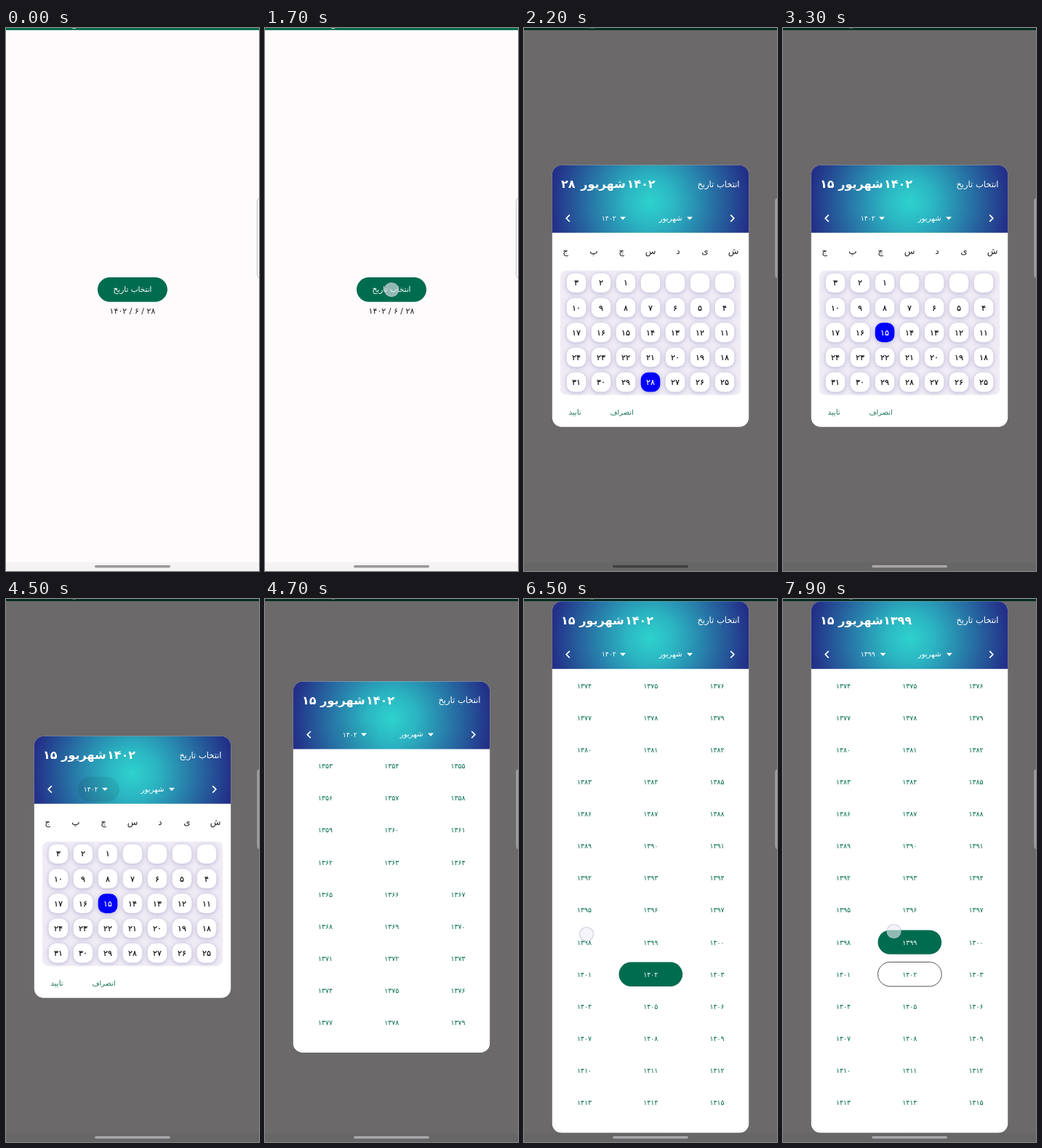
Write an HTML page that moves like this. It is 348x747 px and loops after 8 s.

```html
<!DOCTYPE html>
<html lang="fa">
<head>
<meta charset="utf-8">
<title>Date picker</title>
<style>
html, body { margin: 0; width: 100%; height: 100%; overflow: hidden; background: #fffbfd; }
svg { display: block; width: 100%; height: 100%; }
text { font-family: "DejaVu Sans", "Noto Sans", sans-serif; text-anchor: middle; }
.cell { filter: drop-shadow(0 1px 3px rgba(80, 60, 150, .36)); }
</style>
</head>
<body>
<svg id="stage" viewBox="0 0 348 747"></svg>
<script>
const GREEN = '#006c4f', LOOP = 8000;
const fa = s => String(s).replace(/\d/g, d => String.fromCharCode(1776 + +d));
const clamp = v => Math.max(0, Math.min(1, v));
const ramp = (t, a, b) => clamp((t - a) / (b - a));
const easeOut = (p, n) => 1 - (1 - p) ** n;
const $ = id => document.getElementById(id);
const set = (id, attrs) => { for (const k in attrs) $(id).setAttribute(k, attrs[k]); };

const text = (s, x, y, size, fill, extra = '') =>
  `<text x="${x}" y="${y}" font-size="${size}" fill="${fill}" ${extra}>${fa(s)}</text>`;
const box = (x, y, w, h, r, fill, extra = '') =>
  `<rect x="${x}" y="${y}" width="${w}" height="${h}" rx="${r}" fill="${fill}" ${extra}/>`;
const arrow = (x, id) => `<path id="${id}" d="M${x - 4} 260h8l-4 4.4z" fill="#fff"/>`;

function days() {
  let out = '';
  for (let i = 0; i < 35; i++) {
    const x = 276 - i % 7 * 34, y = 351 + Math.floor(i / 7) * 34.1, day = i - 3;
    out += box(x - 13.3, y - 13.3, 26.6, 26.6, 10, '#fff', `class="cell" id="cell${i}"`);
    if (day > 0) out += text(day, x, y + 3.8, 11, '#111', `id="day${day}" stroke-width=".2" stroke="currentColor"`);
  }
  return out;
}

function years() {
  let out = '';
  for (let i = 0; i < 72; i++) {
    const year = 1353 + i, x = 83 + i % 3 * 91.3, y = 119.7 + Math.floor(i / 3) * 44.05;
    if (year == 1399 || year == 1402)
      out += box(x - 43.8, y - 16.7, 87.6, 33.4, 16.7, 'none', `id="pill${year}" stroke-width="1"`);
    out += text(year, x, y + 3.4, 9.4, GREEN, `id="year${year}"`);
  }
  return out;
}

const bold = 'font-weight="bold"';
$('stage').innerHTML = `
<defs>
  <radialGradient id="glow" gradientUnits="userSpaceOnUse" cx="174" cy="240" r="136">
    <stop offset="0" stop-color="#2ed2cd"/><stop offset=".25" stop-color="#2bb5c2"/>
    <stop offset="1" stop-color="#233088"/>
  </radialGradient>
  <clipPath id="frameClip"><rect id="frame" x="38.8" width="270.4" rx="13"/></clipPath>
  <clipPath id="listClip"><rect id="list" x="38.8" width="270.4"/></clipPath>
</defs>
${box(0, 0, 348, 747, 0, '#fffbfd')}
${box(0, 0, 348, 3, 0, GREEN)}
<path d="M91 0q3 1.6 6-.4" stroke="#b5d6cb" fill="none"/>
${box(126, 343, 96, 33.8, 16.9, GREEN)}
${text('انتخاب تاریخ', 174, 363, 10.5, '#fff')}
${text('1402 / 6 / 28', 174, 393, 11, '#1c1b1d')}
${box(0, 735, 348, 12, 0, '#f6f3f5')}
${box(122, 739, 104, 3.4, 1.7, '#9b999b')}
${box(0, 0, 348, 747, 0, '#000', 'id="scrim"')}
<g id="dialog"><g clip-path="url(#frameClip)">
  ${box(38, 0, 272, 747, 0, '#fff')}
  <g id="calendar">
    ${[...'شیدسچپج'].map((c, i) => text(c, [288, 249, 212, 174, 134, 96, 57][i], 311, 12, '#222')).join('')}
    ${box(50, 334, 248, 171, 8, '#efecf5')}
    ${days()}
    ${text('تایید', 70, 532, 10.2, '#1d765d')}
    ${text('انصراف', 134.5, 532, 9.8, '#1d765d')}
  </g>
  <g clip-path="url(#listClip)">
    ${box(38, 0, 272, 747, 0, '#fff')}
    <g id="years">${years()}</g>
  </g>
  <g id="header">
    ${box(38, 188, 272, 94, 0, 'url(#glow)')}
    ${text('انتخاب تاریخ', 267.5, 219, 11.5, '#fff')}
    ${text('', 51, 220.5, 16, '#fff', bold + ' id="titleDay" style="text-anchor:start"')}
    ${text('شهریور', 109, 220.5, 16, '#fff', bold + ' id="titleMonth"')}
    ${text('', 161, 220.5, 16, '#fff', bold + ' id="titleYear"')}
    ${box(99, 245, 57, 34, 17, '#000', 'id="ripple"')}
    <path d="M284.2 257.5l4.6 4.6-4.6 4.6M62.8 257.5l-4.6 4.6 4.6 4.6" stroke="#fff" stroke-width="1.7" fill="none"/>
    ${text('شهریور', 201.5, 265, 10.2, '#fff')}
    ${arrow(228, 'monthArrow')}
    ${text('', 116.8, 265.3, 9.4, '#fff', 'id="navYear"')}
    ${arrow(136, 'yearArrow')}
  </g>
</g></g>
${box(122, 739, 104, 3.4, 1.7, '#aaa8aa', 'id="homePill"')}
${box(345.5, 234, 10, 110, 4, '#fff', 'fill-opacity=".36" stroke="#999" stroke-opacity=".6"')}
<circle id="touch" r="9.5" fill="#eeecf3" fill-opacity=".6" stroke="#c6c3d6" stroke-opacity=".75" stroke-width="1.2"/>`;

// start, end, x, y
const taps = [
  [1700, 1900, 174, 360], [2900, 3300, 140, 419], [4270, 4470, 128, 262],
  [5950, 6700, 93.5, 535], [7000, 7300, 165, 468], [7600, 8200, 152.5, 457]
];

function draw(t) {
  const shown = ramp(t, 1890, 2083), open = easeOut(ramp(t, 4540, 5080), 3);
  set('scrim', { opacity: .58 * ramp(t, 1930, 2200) });
  set('dialog', { opacity: shown, transform: `translate(0 ${17.5 * (1 - shown)})` });
  set('homePill', { opacity: ramp(t, 2350, 2600) });

  const listH = 638 * open, h = Math.max(360, 93 + listH), top = 368.7 - h / 2;
  set('frame', { y: top, height: h });
  set('list', { y: top + 93, height: listH });
  for (const id of ['calendar', 'header']) set(id, { transform: `translate(0 ${top - 189})` });

  const drag = ramp(t, 5950, 6080) ** 1.5;
  const scroll = 74 * drag + 234.3 * easeOut(ramp(t, 6080, 6500), 2);
  set('years', { transform: `translate(0 ${top - 3.2 - scroll})` });

  const day = t < 3100 ? 28 : 15, year = t < 7000 ? 1402 : 1399;
  for (const d of [15, 28]) {
    set('cell' + (d + 3), { fill: d == day ? '#0000ff' : '#fff' });
    set('day' + d, { fill: d == day ? '#fff' : '#111', color: d == day ? '#fff' : '#111' });
  }
  for (const y of [1399, 1402]) {
    set('pill' + y, { fill: y == year ? GREEN : 'none', stroke: y != year && y == 1402 ? '#555' : 'none' });
    set('year' + y, { fill: y == year ? '#fff' : GREEN });
  }
  $('titleDay').textContent = fa(day);
  $('titleYear').textContent = $('navYear').textContent = fa(year);
  set('titleMonth', { x: day == 28 ? 109 : 107 });
  set('titleYear', { x: day == 28 ? 161 : year == 1402 ? 158.5 : 157.5 });
  set('monthArrow', { transform: `translate(${year == 1402 ? 0 : .8} 0)` });
  set('yearArrow', { transform: `translate(${year == 1402 ? 0 : 1.5} 0)` });
  set('ripple', { opacity: .1 * ramp(t, 4300, 4400) * (1 - ramp(t, 4450, 4750)) });

  const tap = taps.find(([a, b]) => t >= a && t < b);
  set('touch', { opacity: tap ? 1 - ramp(t, tap[1] - 150, tap[1]) : 0 });
  if (tap) {
    const move = tap[0] == 5950 ? drag : 0;
    set('touch', { cx: tap[2] - 7.5 * move, cy: tap[3] - 74 * move });
  }
}

const start = performance.now();
function tick() {
  draw((performance.now() - start) % LOOP);
  requestAnimationFrame(tick);
}
tick();
</script>
</body>
</html>
```
